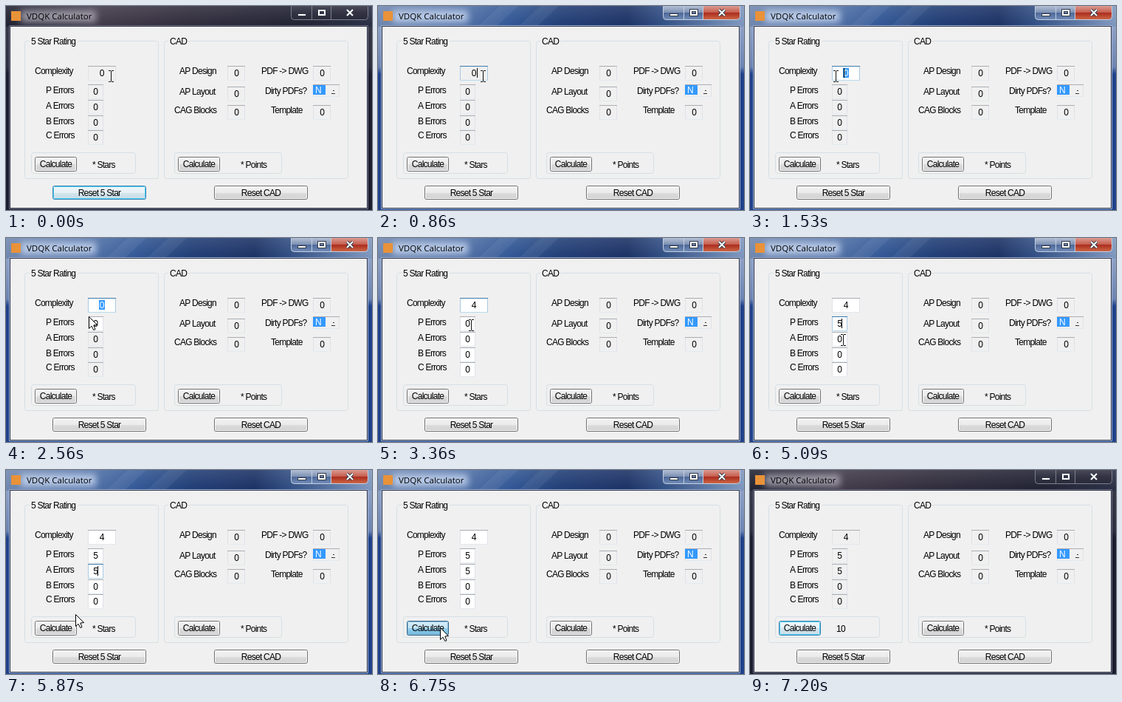
An HTML page with a canvas for the animation above (8 s loop, 496 by 276 pixels).

```html
<!DOCTYPE html>
<html lang="en">
<head>
<meta charset="utf-8">
<title>VDQK Calculator</title>
<style>
  html, body { margin: 0; width: 100%; height: 100%; overflow: hidden; background: #1b1d2e; }
  canvas { display: block; width: 496px; height: 276px; }
</style>
</head>
<body>
<canvas id="stage" width="496" height="276"></canvas>
<script>
const ctx = document.getElementById('stage').getContext('2d');
const LOOP = 8000;
const UI_FONT = '12px "Liberation Sans", Arial, sans-serif';
const TITLE_FONT = '11.5px "Open Sans", sans-serif';
const BLUE = '#3399ff';

// Each track holds its value from the given time until the next entry.
const cursorTrack = [
  [0, 'beam', 138, 87], [980, 'beam', 126, 87], [1110, 'beam', 113, 87], [1260, 'beam', 112, 87],
  [2560, 'arrow', 112, 106], [2700, 'arrow', 108, 129], [2820, 'arrow', 107, 148],
  [2940, 'arrow', 110, 159], [3090, 'arrow', 134, 130], [3240, 'arrow', 133, 122],
  [3360, 'beam', 122, 110], [3480, 'beam', 117, 109], [3630, 'beam', 113, 109],
  [3750, 'arrow', 107, 115], [3870, 'arrow', 105, 118], [4110, 'arrow', 104, 121],
  [4360, 'arrow', 104, 124], [4490, 'arrow', 107, 156], [4630, 'beam', 117, 152],
  [4780, 'beam', 124, 133], [4940, 'beam', 123, 127], [5090, 'beam', 122, 130],
  [5240, 'beam', 120, 132], [5360, 'beam', 114, 133], [5600, 'arrow', 108, 158],
  [5720, 'arrow', 102, 174], [5870, 'arrow', 94, 195], [6020, 'arrow', 85, 213],
  [6180, 'arrow', 84, 213], [7200, 'none', 0, 0]
];
const focusTrack = [[0, ''], [860, 'complexity'], [3870, 'P'], [5240, 'A'], [6630, '']];
const selectTrack = [[0, ''], [980, 'complexity'], [2820, ''], [3870, 'P'], [5090, ''], [5240, 'A'], [5360, '']];
const caretTrack = [[0, 0], [860, 134, 84], [980, 0], [1530, 127, 84], [2090, 0], [2820, 134, 84],
  [3360, 0], [5090, 124, 109], [5240, 0], [5360, 124, 130], [6020, 0]];
const calcTrack = [[0, 'normal'], [6020, 'hot'], [6630, 'pressed'], [6910, 'focused']];

const fields = [
  { id: 'complexity', x: 111, y: 81, w: 38, value: 4, typed: 2820, white: 980 },
  { id: 'P', x: 111, y: 106, w: 21, value: 5, typed: 5090, white: 2560 },
  { id: 'A', x: 111, y: 127, w: 21, value: 5, typed: 5360, white: 2700 },
  { id: 'B', x: 111, y: 148, w: 21, white: 2700 },
  { id: 'C', x: 111, y: 168, w: 21, white: 2820 },
  ...[81, 109, 134].map(y => ({ x: 300, y, w: 24 })),
  ...[81, 134].map(y => ({ x: 416, y, w: 24 }))
];

const labels = [
  ['Complexity', 39, 92], ['P Errors', 54, 118], ['A Errors', 54, 139], ['B Errors', 54, 160],
  ['C Errors', 54, 179], ['AP Design', 235, 92], ['AP Layout', 235, 120], ['CAG Blocks', 228, 145],
  ['PDF -> DWG', 346, 92], ['Dirty PDFs?', 351, 119], ['Template', 359, 145], ['* Points', 318, 219]
];

const skins = {
  normal: ['#707070', '#f3f3f3', '#ebebeb', '#dddddd', '#cfcfcf'],
  focused: ['#3c7fb1', '#f0f6f9', '#e6f0f5', '#d5e5ed', '#c6dce7'],
  hot: ['#3c7fb1', '#eaf6fd', '#d9f0fc', '#bee6fd', '#a7d9f5'],
  pressed: ['#2c628b', '#d8edf8', '#c4e5f6', '#98d1ef', '#68b3db']
};

const glass = {
  active: {
    base: '#1f428a',
    title: [[0, '#6b84ac'], [.2, '#5473a8'], [.36, '#2b5292'], [.5, '#1a3872'], [.68, '#152b60'],
      [.78, '#2b4a80'], [1, '#7c95bd']],
    buttons: [[0, '#b3bfd3'], [.48, '#7f92b5'], [.5, '#4d6797'], [1, '#6f8ab6']],
    line: '#c3cee2', edge: '#9fb3d6', glow: 'rgba(205,220,245,.8)', shine: .5
  },
  inactive: {
    base: '#1b1d2f',
    title: [[0, '#1a1b2b'], [.25, '#3b3343'], [.5, '#2a2636'], [.8, '#191b2c'], [1, '#252a40']],
    buttons: [[0, '#4a4a59'], [.5, '#333443'], [1, '#292a3a']],
    line: '#7d7e8e', edge: '#6d6d80', glow: 'rgba(190,188,200,.72)', shine: .12
  }
};

function at(track, t) {
  let entry = track[0];
  for (const e of track) if (e[0] <= t) entry = e;
  return entry.slice(1);
}

function rect(x, y, w, h, fill) {
  ctx.fillStyle = fill;
  ctx.fillRect(x, y, w, h);
}

function fade(x0, y0, x1, y1, stops) {
  const g = ctx.createLinearGradient(x0, y0, x1, y1);
  stops.forEach(([p, c]) => g.addColorStop(p, c));
  return g;
}

function rounded(x, y, w, h, r, stroke, fill) {
  ctx.beginPath();
  ctx.roundRect(x + .5, y + .5, w - 1, h - 1, r);
  if (fill) { ctx.fillStyle = fill; ctx.fill(); }
  ctx.strokeStyle = stroke;
  ctx.lineWidth = 1;
  ctx.stroke();
}

function text(s, x, y, { align = 'left', color = '#000', font = UI_FONT } = {}) {
  ctx.font = font;
  ctx.letterSpacing = font === UI_FONT && s.length > 1 ? '-0.75px' : '0px';
  ctx.textAlign = align;
  ctx.fillStyle = color;
  ctx.fillText(s, x, y);
}

function fillPath(points, fill) {
  ctx.beginPath();
  points.forEach(([x, y]) => ctx.lineTo(x, y));
  ctx.closePath();
  ctx.fillStyle = fill;
  ctx.fill();
}

function drawFrame(active) {
  const look = active ? glass.active : glass.inactive;
  rect(0, 0, 496, 276, look.base);
  rect(0, 0, 496, 28, fade(0, 0, 496, 0, look.title));
  rect(0, 0, 496, 28, fade(0, 0, 0, 28, [[0, 'rgba(255,255,255,.14)'], [1, 'rgba(255,255,255,.02)']]));
  if (active) {
    for (const x of [135, 190]) {
      fillPath([[x + 30, 0], [x + 55, 0], [x + 25, 28], [x, 28]], 'rgba(255,255,255,.06)');
    }
  }
  const shine = fade(0, 28, 0, 92, [[0, `rgba(255,255,255,${look.shine})`],
    [.85, `rgba(255,255,255,${look.shine * .7})`], [1, 'rgba(255,255,255,0)']]);
  rect(0, 28, 6, 64, shine);
  rect(489, 28, 7, 64, shine);

  ctx.save();
  ctx.filter = 'blur(5px)';
  rect(20, 6, 102, 16, look.glow);
  ctx.restore();
  rect(7, 7, 13, 13, '#e8923a');
  text('VDQK Calculator', 28, 18, { font: TITLE_FONT });

  rounded(4, 26, 487, 249, 0, look.edge);
  rect(5, 27, 485, 247, '#30364a');
  rect(6, 28, 483, 245, '#f0f0f0');
  drawWindowButtons(active, look);
}

function drawWindowButtons(active, { buttons, line }) {
  const red = [[0, '#dc9b91'], [.48, '#c65d4e'], [.5, '#a92b1d'], [1, '#cd6543']];
  ctx.beginPath();
  ctx.roundRect(386.5, -3.5, 104, 22, 4);
  ctx.fillStyle = fade(0, 0, 0, 18, buttons);
  ctx.fill();
  if (active) {
    ctx.beginPath();
    ctx.roundRect(441, -3, 49, 21, [0, 0, 4, 0]);
    ctx.fillStyle = fade(0, 0, 0, 18, red);
    ctx.fill();
  }
  rounded(386, -4, 105, 23, 4, line);
  rect(414, 0, 1, 18, line);
  rect(440, 0, 1, 18, line);

  rect(395, 10, 12, 4, '#333b4a');
  rect(396, 11, 10, 2, '#fff');
  for (const [color, width] of [['#333b4a', 4], ['#fff', 2]]) {
    ctx.strokeStyle = color;
    ctx.lineWidth = width;
    ctx.strokeRect(424, 6, 8, 6);
    ctx.beginPath();
    ctx.moveTo(462, 5); ctx.lineTo(470, 13);
    ctx.moveTo(470, 5); ctx.lineTo(462, 13);
    ctx.stroke();
  }
}

function drawGroup(title, x, w, titleX, titleWidth) {
  rounded(x, 47, w, 187, 3, '#d5dfe5');
  rect(titleX - 2, 46, titleWidth, 4, '#f0f0f0');
  text(title, titleX, 52);
}

function drawButton(label, x, y, w, h, state) {
  const [border, a, b, c, d] = skins[state];
  rounded(x, y, w, h, 2, border, fade(0, y, 0, y + h, [[0, a], [.5, b], [.51, c], [1, d]]));
  rounded(x + 1, y + 1, w - 2, h - 2, 1,
    state === 'focused' ? '#46d0f2' : state === 'pressed' ? '#8fbcd5' : '#fafafa');
  text(label, x + w / 2, Math.ceil(y + h / 2 + 4), { align: 'center' });
}

function boxEdges(x, y, w, h, focused) {
  const [top, side, base] = focused ? ['#3d7bad', '#a9cae4', '#b7d9ed'] : ['#abadb3', '#dfe2e9', '#e3e9ef'];
  rect(x, y, 1, h, side);
  rect(x + w - 1, y, 1, h, side);
  rect(x, y + h - 1, w, 1, base);
  rect(x, y, w, 1, top);
}

function drawField(f, t, active, focus, selected) {
  const white = active && f.white && t >= f.white;
  const isSelected = f.id && f.id === selected;
  const mid = f.x + f.w / 2 + (f.id ? 0 : .5);
  rect(f.x, f.y, f.w, 20, white ? '#fff' : '#f0f0f0');
  boxEdges(f.x, f.y, f.w, 20, f.id && f.id === focus);
  if (isSelected) rect(Math.round(mid) - 4, f.y + 3, 8, 13, BLUE);
  const value = f.typed && t >= f.typed ? f.value : 0;
  text(String(value), mid, f.y + 14, { align: 'center', color: isSelected ? '#fff' : '#000' });
}

function drawSpinner() {
  boxEdges(416, 106, 36, 17, false);
  rect(416, 107, 17, 13, BLUE);
  text('N', 419, 118, { color: '#fff' });
  rect(443, 114, 2, 1, '#333');
  rect(441, 118, 5, 1, '#333');
}

function drawCursor(kind, x, y) {
  ctx.save();
  ctx.translate(x, y);
  if (kind === 'arrow') {
    fillPath([[.5, .5], [.5, 16.5], [4, 13.2], [6.8, 18.5], [9, 17.6], [6.8, 12], [11.5, 11.5]], '#fff');
    ctx.strokeStyle = '#000';
    ctx.lineWidth = 1;
    ctx.stroke();
  } else if (kind === 'beam') {
    for (const edge of [0, 15]) {
      rect(1, edge, 3, 1, '#111');
      rect(5, edge, 3, 1, '#111');
    }
    rect(4, 1, 1, 14, '#111');
  }
  ctx.restore();
}

function draw(t) {
  const active = t >= 860 && t < 6910;
  const [focus] = at(focusTrack, t);
  const [selected] = at(selectTrack, t);
  const [caretX, caretY] = at(caretTrack, t);

  drawFrame(active);
  drawGroup('5 Star Rating', 25, 182, 34, 66);
  drawGroup('CAD', 214, 250, 222, 27);
  rounded(34, 198, 142, 29, 3, '#d5dfe5');
  rounded(228, 198, 146, 29, 3, '#d5dfe5');
  labels.forEach(([s, x, y]) => text(s, x, y));
  text(t < 6910 ? '* Stars' : '10', 117, 219);

  fields.forEach(f => drawField(f, t, active, focus, selected));
  drawSpinner();
  drawButton('Calculate', 39, 204, 57, 20, at(calcTrack, t)[0]);
  drawButton('Calculate', 233, 204, 57, 20, 'normal');
  drawButton('Reset 5 Star', 63, 243, 127, 19, t < 860 ? 'focused' : 'normal');
  drawButton('Reset CAD', 282, 243, 127, 19, 'normal');

  if (caretX) rect(caretX, caretY, 1, 13, '#000');
  drawCursor(...at(cursorTrack, t));
}

const start = performance.now();
function tick() {
  draw((performance.now() - start) % LOOP);
  requestAnimationFrame(tick);
}
tick();
</script>
</body>
</html>
```
